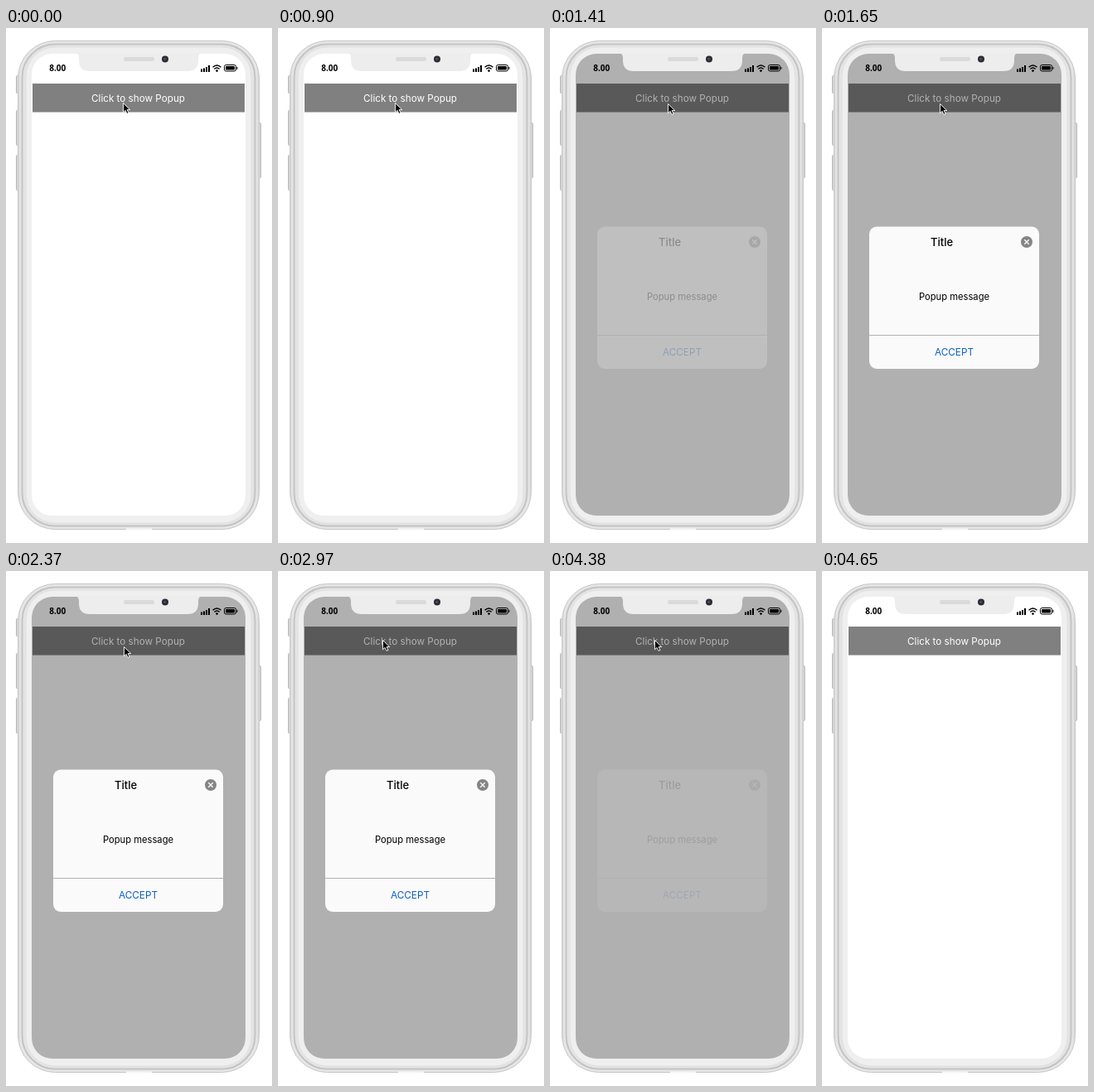
Write an HTML page that moves like this. It is 321 px wide and 621 px high and loops after 5100 ms.

```html
<!DOCTYPE html>
<html lang="en">
<head>
<meta charset="utf-8">
<title>Popup demo</title>
<style>
  html, body { margin: 0; width: 100%; height: 100%; overflow: hidden; background: #fff; }
  svg { display: block; width: 321px; height: 621px; }
  text { font-family: Inter, "Open Sans", sans-serif; text-anchor: middle; }
</style>
</head>
<body>
<svg viewBox="0 0 321 621">
  <defs>
    <linearGradient id="metal">
      <stop offset="0" stop-color="#d8d8d8"/>
      <stop offset=".012" stop-color="#e6e6e6"/>
      <stop offset=".988" stop-color="#e6e6e6"/>
      <stop offset="1" stop-color="#d8d8d8"/>
    </linearGradient>
    <clipPath id="screenClip"><rect x="31" y="31" width="258" height="557" rx="25"/></clipPath>
  </defs>

  <!-- phone body -->
  <g fill="#dedede" stroke="#b4b4b4">
    <rect x="12.5" y="57.5" width="4" height="21" rx="1"/>
    <rect x="12.5" y="99.5" width="4" height="42" rx="1"/>
    <rect x="12.5" y="153.5" width="4" height="42" rx="1"/>
    <rect x="303.5" y="114.5" width="4" height="66" rx="1"/>
  </g>
  <rect x="14.5" y="15.5" width="291" height="589" rx="45" fill="url(#metal)" stroke="#c6c6c6"/>
  <rect x="19.5" y="19.5" width="281" height="581" rx="40" fill="#e4e4e4" stroke="#c4c4c4" stroke-width="2"/>
  <rect x="24" y="23" width="272" height="574" rx="35" fill="#efefef" stroke="#e0e0e0"/>
  <path d="M145 604.5h31" stroke="#f6f6f6" stroke-width="2"/>

  <!-- screen -->
  <g clip-path="url(#screenClip)">
    <rect x="31" y="31" width="258" height="557" fill="#fff"/>
    <rect id="statusShade" x="31" y="31" width="258" height="557" fill="#b0b0b0"/>
    <rect x="32" y="67" width="256" height="520" fill="#fff"/>
    <rect x="32" y="67" width="256" height="34.5" fill="#808080"/>
    <text x="159.5" y="88.6" font-size="11.7" fill="#fff">Click to show Popup</text>
    <rect id="shade" x="32" y="67" width="256" height="520" fill-opacity=".31"/>
  </g>

  <!-- notch -->
  <path d="M82 30q6 0 6 6v3q0 13 13 13h118q13 0 13-13v-3q0-6 6-6z" fill="#ededed"/>
  <rect x="142" y="35" width="37" height="5" rx="2.5" fill="#dadada"/>
  <circle cx="192" cy="37.5" r="4" fill="#2c2c36"/>
  <circle cx="191.7" cy="37.3" r="1.6" fill="#444a6c"/>

  <!-- status icons -->
  <text x="62.3" y="52" font-size="10" font-weight="700" style="font-family:'Open Sans',sans-serif">8.00</text>
  <path d="M236 53v-3.5M239 53v-4.5M242 53v-6M245 53v-8" stroke="#000" stroke-width="2"/>
  <g fill="none" stroke="#000" stroke-width="1.4">
    <path d="M249.5 47.3q5-4.6 10 0M251.4 49.5q3.1-2.8 6.2 0"/>
    <rect x="263.5" y="44.5" width="14" height="7.5" rx="2" stroke-width="1"/>
  </g>
  <circle cx="254.5" cy="51.6" r="1.3"/>
  <rect x="265" y="46" width="11" height="4.5" rx=".8"/>
  <path d="M279 46.8v3" stroke="#000"/>

  <g id="popup">
    <rect x="57" y="239.5" width="205" height="171.5" rx="9" fill="#fafafa"/>
    <path d="M57 370.5h205" stroke="#b2b2b2"/>
    <text x="144.5" y="262.8" font-size="13" font-weight="500">Title</text>
    <circle cx="247" cy="258" r="7" fill="#858588"/>
    <path d="M244.3 255.3l5.4 5.4m0-5.4l-5.4 5.4" stroke="#fff" stroke-width="1.3"/>
    <text x="159.5" y="328.3" font-size="11.2">Popup message</text>
    <text x="159.5" y="395.2" font-size="11.75" fill="#0b5fc4">ACCEPT</text>
  </g>

  <path id="cursor" d="M.5 .5v11.2l2.6-2.4 1.9 4 2-.9-1.9-3.9h3.6z" stroke="#fff" stroke-width=".9"/>
</svg>
<script>
const LOOP = 5100;
const [statusShade, shade, popup, cursor] =
  ["statusShade", "shade", "popup", "cursor"].map(id => document.getElementById(id));

const clamp = v => Math.max(0, Math.min(1, v));
const progress = (t, from, to) => clamp((t - from) / (to - from));
const ease = p => p * p * (3 - 2 * p);
const show = (el, on) => el.setAttribute("visibility", on ? "visible" : "hidden");

function cursorAt(t) {
  if (t < 1170) return [141, 90];
  const move = ease(progress(t, 2640, 2910));
  const leave = progress(t, 4560, 4620);
  return [142 - 16 * move + 10 * leave, 91 - 8 * move - 15 * leave];
}

function draw(t) {
  show(statusShade, t >= 1350 && t < 4410);
  show(shade, t >= 1380 && t < 4410);
  popup.setAttribute("opacity", progress(t, 1350, 1650) * (1 - progress(t, 4110, 4410)));
  show(cursor, t < 4650);
  cursor.setAttribute("transform", `translate(${cursorAt(t)})`);
}

const start = performance.now();
function tick() {
  const t = (performance.now() - start) % LOOP;
  draw(Math.floor(t / 30) * 30);
  requestAnimationFrame(tick);
}
tick();
</script>
</body>
</html>
```
